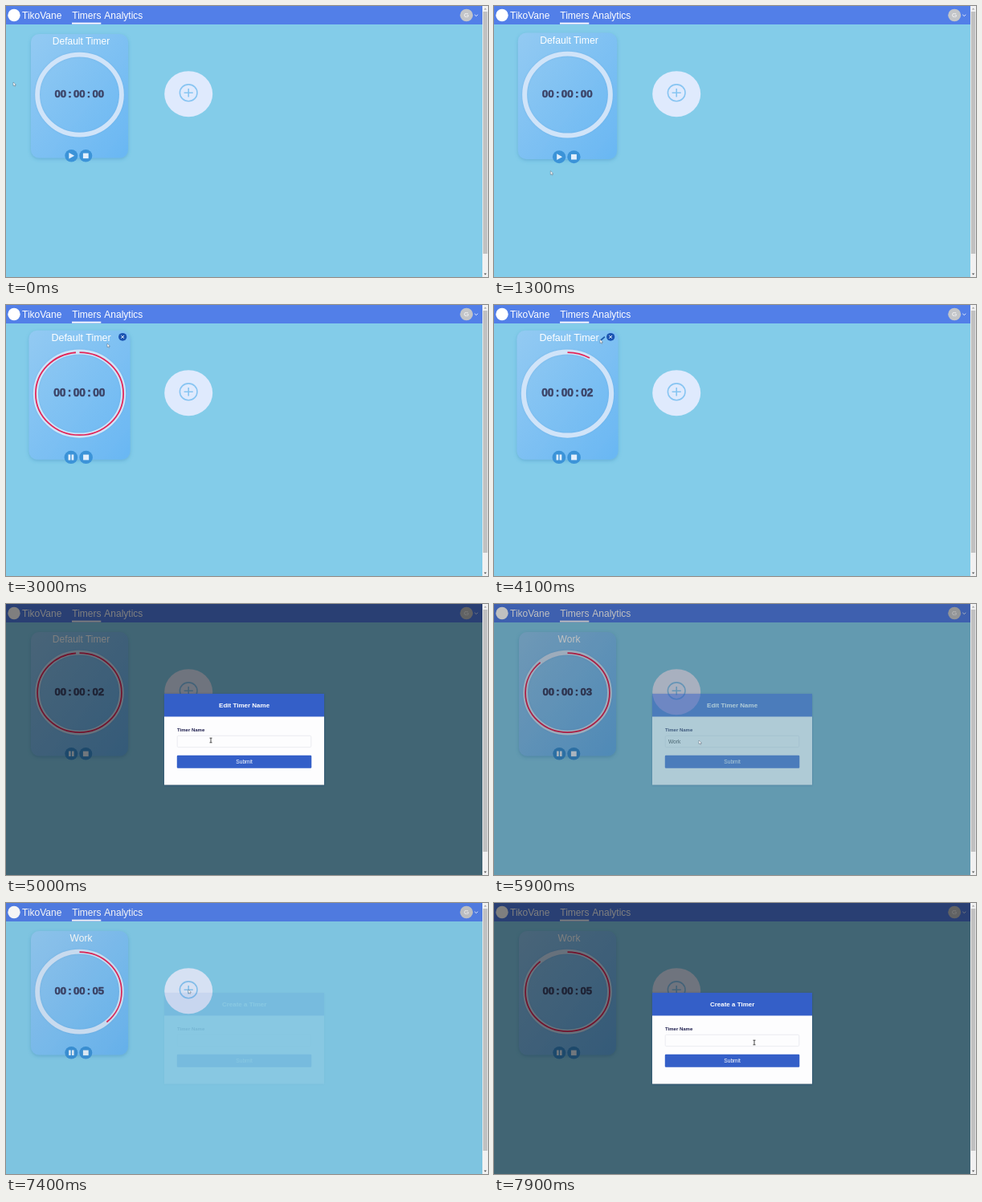
Write an HTML page that moves like this. It is 600 px wide and 338 px high and loops after 8000 ms.

```html
<!DOCTYPE html>
<html lang="en">
<head>
<meta charset="utf-8">
<title>Timers</title>
<style>
  html, body { margin: 0; width: 100%; height: 100%; overflow: hidden; background: #83cce9; }
  svg { display: block; width: 100vw; height: 100vh; }
  text { font: 12px "Liberation Sans", Arial, sans-serif; fill: #fff; }
  .mid { text-anchor: middle; }
  #clock text { font-size: 13.2px; font-weight: bold; fill: #3c4468; stroke: #3c4468; stroke-width: .5; text-anchor: middle; }
  #modal .heading { font-size: 8px; font-weight: bold; }
  #modal .label { font-size: 6px; font-weight: bold; fill: #1b1b4b; }
  #modal .small { font-size: 6.6px; }
  #modal #typed { fill: #333; }
</style>
</head>
<body>
<svg viewBox="0 0 600 338">
  <defs>
    <linearGradient id="cardFill" x1="0" y1="0" x2="1" y2="1">
      <stop offset="0" stop-color="#93caf2"/>
      <stop offset="1" stop-color="#69b7f3"/>
    </linearGradient>
    <filter id="soft" x="-20%" y="-20%" width="140%" height="140%">
      <feDropShadow dx="0" dy="1.5" stdDeviation="2.2" flood-color="#3a86bd" flood-opacity=".4"/>
    </filter>
    <filter id="deep" x="-10%" y="-10%" width="120%" height="120%">
      <feDropShadow dx="0" dy=".5" stdDeviation=".9" flood-color="#24467c" flood-opacity=".7"/>
    </filter>
    <filter id="glow" x="-20%" y="-20%" width="140%" height="140%">
      <feDropShadow dx="0" dy="0" stdDeviation="1" flood-color="#5fa8e0" flood-opacity=".6"/>
    </filter>
  </defs>

  <rect width="600" height="338" fill="#83cce9"/>

  <g id="card">
    <rect x="31" y="35" width="121" height="154.5" rx="10" fill="url(#cardFill)" filter="url(#soft)"/>
    <text id="title" class="mid" x="93.5" y="48"></text>
    <ellipse cx="91.5" cy="110.6" rx="52.4" ry="50" fill="none" stroke="#d0e4f9" stroke-width="5.8" filter="url(#glow)"/>
    <path id="arc" d="M91.5 61.2a52.4 49.5 0 0 1 0 99a52.4 49.5 0 0 1 0-99" pathLength="100" fill="none" stroke="#e32558" stroke-width="1.7"/>
    <g id="clock"></g>
    <g fill="#3b93d8">
      <ellipse cx="81.3" cy="186.8" rx="8" ry="7.8"/>
      <ellipse cx="99.3" cy="186.8" rx="8" ry="7.8"/>
    </g>
    <g fill="#e2effc">
      <path id="play" d="M78.4 183v7.6l6.8-3.8z"/>
      <path id="pause" d="M78.1 183.5h2.6v6.6h-2.6zM82 183.5h2.6v6.6h-2.6z"/>
      <rect x="95.9" y="183.6" width="6.8" height="6.5"/>
    </g>
    <g id="close">
      <ellipse cx="143" cy="42.7" rx="4.9" ry="4.7" fill="#1b54b2"/>
      <path d="M141.2 41l3.6 3.4m0-3.4l-3.6 3.4" stroke="#fff" stroke-width=".9"/>
    </g>
    <path id="pencil" d="M130.8 47.2l.7-2 3.9-3.3 1.2 1.3-3.8 3.3z" fill="#1d5cab"/>
  </g>

  <ellipse cx="227.2" cy="109.7" rx="30" ry="28.5" fill="#dfeafd"/>
  <g fill="none" stroke="#88c5f2" stroke-width="1.6">
    <ellipse cx="227.2" cy="108.3" rx="10.8" ry="10.4"/>
    <path d="M221.6 108.3h11.2M227.2 103v10.6"/>
  </g>

  <rect width="593" height="23" fill="#527fe8"/>
  <circle cx="10" cy="11.5" r="7.7" fill="#fff"/>
  <text x="20" y="15.5">TikoVane</text>
  <text x="82.3" y="15.5">Timers</text>
  <text x="122.3" y="15.5">Analytics</text>
  <rect x="82" y="20.7" width="36.3" height="1.9" fill="#fff"/>
  <ellipse cx="573.2" cy="11.5" rx="8" ry="7.7" fill="#c3c5c8"/>
  <text class="mid" x="573.2" y="14.3" style="font-size:8px">G</text>
  <path d="M583.3 10.8l2 1.8 2-1.8" fill="none" stroke="#e4ecff"/>

  <rect id="shade" width="593" height="338"/>

  <rect x="593" width="7" height="338" fill="#f1f1f1"/>
  <rect x="593.8" y="7" width="5.5" height="302" fill="#c1c1c1"/>
  <path d="M594.9 4.6l1.7-2 1.7 2z" fill="#a0a0a0"/>
  <path d="M594.9 333.5l1.7 2 1.7-2z" fill="#505050"/>

  <g id="modal">
    <rect x="197" y="112" width="199" height="113.5" fill="#fdfdfe" filter="url(#deep)"/>
    <rect x="197" y="112" width="199" height="28.5" fill="#345fc8"/>
    <text id="heading" class="heading mid" x="296.6" y="129.3"></text>
    <text class="label" x="213" y="159">Timer Name</text>
    <rect x="213.2" y="164.3" width="166.6" height="14.4" rx="1.5" fill="#fdfdfe" stroke="#e6e8ee" stroke-width=".8"/>
    <text id="typed" class="small" x="217" y="174"></text>
    <rect x="212.8" y="188.7" width="167.5" height="16.1" rx="1.3" fill="#345fc8"/>
    <text class="small mid" x="296.6" y="199.1">Submit</text>
  </g>

  <g id="pointer">
    <path id="arrow" d="M0 0v4.6l1.1-.9.8 1.7.9-.4-.8-1.7h1.5z" fill="#fff" stroke="#456" stroke-width=".4"/>
    <path id="beam" d="M-1.5-2.8h3M0-2.8v5.6M-1.5 2.8h3" fill="none" stroke="#222" stroke-width=".8"/>
  </g>
</svg>
<script>
const LOOP = 8000, START = 2015, GROW = 400, FADE = 300;
const EDIT = 4400, SUBMIT = 5750, CREATE = 7350;
const HOVERS = [[640, 1085], [1650, EDIT]];
// Each stroke: start, end, and where the pointer comes to rest.
const HOME = [9, 95];
const STROKES = [
  [100, 1380, 71, 207], [1400, 1850, 80, 187], [2150, 2980, 126, 48],
  [3050, 3700, 132, 43], [EDIT + 50, 4950, 255, 170],
  [6250, 7000, 227, 108], [CREATE + 50, 7850, 324, 174]
];

const $ = id => document.getElementById(id);
const ease = x => { x = Math.min(1, Math.max(0, x)); return x * x * (3 - 2 * x); };
const ramp = (t, from, length) => ease((t - from) / length);
const show = (id, on) => $(id).setAttribute("visibility", on ? "visible" : "hidden");

const digits = Array.from({ length: 5 }, (_, i) => {
  const part = document.createElementNS("http://www.w3.org/2000/svg", "text");
  part.setAttribute("x", 91.3 + (i - 2) * 11.75);
  part.setAttribute("y", 113.6);
  part.textContent = i % 2 ? ":" : "00";
  return $("clock").appendChild(part);
});

function pointerAt(t) {
  let [x, y] = HOME;
  for (const [from, to, endX, endY] of STROKES) {
    const k = ramp(t, from, to - from);
    x += (endX - x) * k;
    y += (endY - y) * k;
  }
  return [x, y];
}

function draw(t) {
  const running = t >= START;
  const elapsed = Math.max(0, (t - START) / 1000);
  const seconds = Math.floor(elapsed);

  const hover = HOVERS.reduce((sum, [on, off]) => sum + ramp(t, on, GROW) - ramp(t, off, GROW), 0);
  $("card").setAttribute("transform", `translate(91.5 112) scale(${1 + .042 * hover}) translate(-91.5 -112)`);
  $("title").textContent = t < SUBMIT ? "Default Timer" : "Work";
  digits[4].textContent = String(seconds).padStart(2, "0");
  $("arc").setAttribute("stroke-dasharray", `${(elapsed - seconds) * 100} 200`);
  show("arc", running);
  show("play", !running);
  show("pause", running);
  show("close", HOVERS.some(([on, off]) => t >= on && t < off));
  show("pencil", t >= 3150 && t < EDIT);

  const open = ramp(t, EDIT, FADE) - ramp(t, SUBMIT, FADE) + ramp(t, CREATE, FADE);
  $("shade").setAttribute("opacity", open / 2);
  $("modal").setAttribute("opacity", open);
  $("heading").textContent = t < CREATE ? "Edit Timer Name" : "Create a Timer";
  $("typed").textContent = t < CREATE ? "Work".slice(0, Math.max(0, Math.ceil((t - 5080) / 120))) : "";

  const [x, y] = pointerAt(t);
  const overInput = open > .5 && x > 213 && x < 380 && y > 164 && y < 179;
  $("pointer").setAttribute("transform", `translate(${x} ${y})`);
  show("arrow", !overInput);
  show("beam", overInput);
}

const begin = performance.now();
function tick() {
  draw((performance.now() - begin) % LOOP);
  requestAnimationFrame(tick);
}
tick();
</script>
</body>
</html>
```
